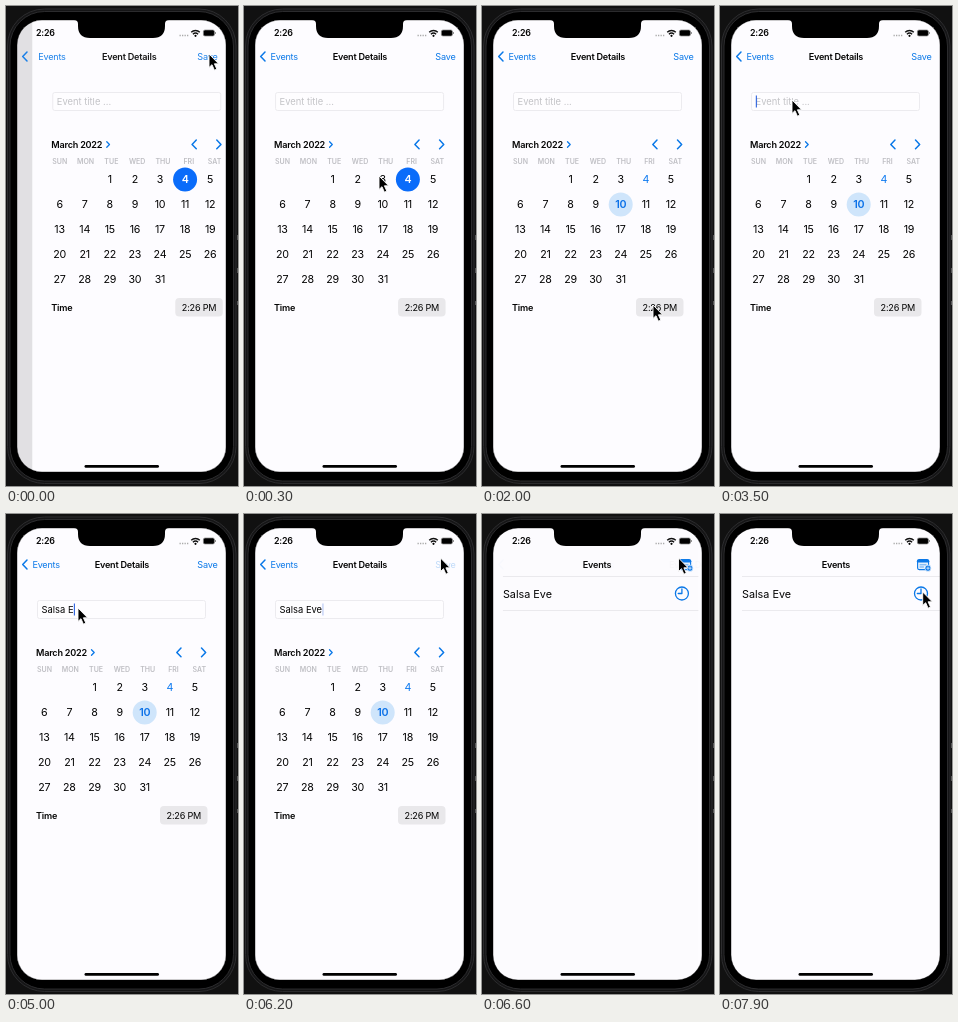
Recreate the animation shown at these times as an HTML page. Size 232 by 480 pixels, loop 8000 ms.

```html
<!DOCTYPE html>
<html lang="en">
<head>
<meta charset="utf-8">
<title>Event form</title>
<style>
  html, body { margin: 0; width: 100%; height: 100%; overflow: hidden; background: #111; }
  svg { display: block; }
  text { font: 9.1px Inter, sans-serif; letter-spacing: -.024em; fill: #050505; white-space: pre; }
  .bold { font-weight: 600; }
  .mid { text-anchor: middle; }
  .blue { fill: #0a78e8; }
  .field { font-size: 9.4px; letter-spacing: 0; }
  .day { font-size: 10.7px; }
  .week { font-size: 7px; font-weight: 600; letter-spacing: 0; fill: #bfbfc4; }
  .stroke { fill: none; stroke: #0a78e8; stroke-width: 1.5; stroke-linecap: round; stroke-linejoin: round; }
  .page { fill: #fdfcff; }
</style>
</head>
<body>
<svg width="232" height="480" viewBox="0 0 232 480">
  <clipPath id="screen"><rect x="11" y="14" width="209" height="452" rx="25"/></clipPath>
  <rect width="232" height="480" fill="#111"/>
  <path d="M231.5 229v70" stroke="#555" stroke-dasharray="5 28"/>
  <rect x="1.5" y="3" width="228.5" height="474.5" rx="37" fill="#151516" stroke="#2c2c2e"/>
  <rect x="4" y="5.5" width="223.5" height="469.5" rx="34.5" stroke="#343436" stroke-width=".8"/>

  <g clip-path="url(#screen)">
    <g id="list">
      <rect class="page" x="11" y="14" width="272" height="452"/>
      <g id="row">
        <path d="M22 62.5H220M22 96.5H220" stroke="#ebeaee"/>
        <text x="22" y="83.8" style="font-size:10.8px;letter-spacing:0">Salsa Eve</text>
        <g class="stroke" style="stroke-width:1.3">
          <circle cx="201" cy="79.5" r="6.5"/>
          <path d="M201 75V79.5H197.3"/>
        </g>
      </g>
    </g>
    <rect id="dim" x="11" y="14" width="209" height="452"/>

    <g id="form">
      <rect class="page" x="11" y="14" width="209" height="452"/>
      <rect x="31.5" y="86.5" width="168" height="18" rx="2" fill="#fefdff" stroke="#ecebef"/>
      <text id="title" class="field" x="35.5" y="99.2"></text>
      <rect id="caret" y="89.5" width="1.1" height="12" fill="#2c62e0"/>
      <text class="bold" x="30" y="141.6">March 2022</text>
      <path class="stroke" d="M85.5 135.8l2.7 2.7-2.7 2.7" style="stroke-width:1.3"/>
      <path class="stroke" d="M175 134l-4.2 4.4 4.2 4.4M195.5 134l4.2 4.4-4.2 4.4"/>
      <circle id="mark" r="12"/>
      <g id="days"></g>
      <text class="bold" x="30" y="304.6">Time</text>
      <rect x="154" y="292" width="47.5" height="18.5" rx="4" fill="#e9e8eb"/>
      <text x="160.6" y="304.6">2:26 PM</text>
    </g>

    <g id="formNav">
      <path class="stroke" d="M21 46l-4.3 4.5 4.3 4.5"/>
      <text id="back" class="blue" x="26.4" y="53.7">Events</text>
      <text id="formTitle" class="bold mid" x="115.9" y="53.7">Event Details</text>
      <text id="save" class="blue" x="191.3" y="53.7">Save</text>
    </g>
    <g id="listNav">
      <text id="listTitle" class="bold mid" x="115.9" y="53.7">Events</text>
      <g class="stroke" style="stroke-width:1.1">
        <rect x="197.6" y="45.6" width="11" height="10" rx="1.6" fill="#e4f0fc"/>
        <path d="M198.3 47.2h9.6" stroke-width="2.8"/>
        <path d="M200 50.8h6M200 53h3.5" stroke-width=".6"/>
        <circle cx="208" cy="54.2" r="3.1" fill="#0a78e8" stroke="#fdfcff" stroke-width=".7"/>
        <path d="M206.7 54.2h2.6M208 52.9v2.6" stroke="#fff" stroke-width=".7"/>
      </g>
    </g>

    <text class="bold" x="30" y="30.2" style="font-size:8.9px">2:26</text>
    <path d="M173.5 29.5h9" stroke="#aaa" stroke-width="1.3" stroke-dasharray="1.3 1.2"/>
    <path d="M185.2 26.3a6.2 6.2 0 0 1 8.6 0M186.9 28.2a3.8 3.8 0 0 1 5.2 0" fill="none" stroke="#111" stroke-width="1.4"/>
    <circle cx="189.5" cy="29.8" r="1.1"/>
    <rect x="197.4" y="24" width="11" height="6" rx="1.6" stroke="#888" stroke-width=".7"/>
    <path d="M209.4 26v2" stroke="#888"/>
    <path d="M68 14q4 0 4 4v2q0 12 12 12h63q12 0 12-12v-2q0-4 4-4z"/>
    <rect x="78.5" y="459" width="74.5" height="2.8" rx="1.4"/>
  </g>
  <rect x="11" y="14" width="209" height="452" rx="25" fill="none" stroke="#000" stroke-opacity=".4"/>

  <path id="cursor" d="M0 0V13.4L3 10.7 5.4 16.2 7.8 15.1 5.4 9.8H9.6Z" stroke="#fff" stroke-width=".9" stroke-linejoin="round"/>
</svg>
<script>
const LOOP = 8000, WIDTH = 209, NAME = 'Salsa Eve';
const $ = id => document.getElementById(id);
const dayX = n => 38.3 + 25.1 * ((n + 1) % 7);
const dayY = n => 173.5 + 25 * Math.floor((n + 1) / 7);

// time, x, y of the pointer
const path = [
  [0, 203, 48], [300, 135, 170], [500, 137, 197], [1100, 137, 197], [1700, 171, 299],
  [2100, 171, 299], [2700, 72, 94], [5500, 72, 94], [5900, 196.5, 44],
  [6700, 196.5, 44], [7300, 202.7, 78], [LOOP, 202.7, 78]
];

function addText(parent, className, x, y, content) {
  const el = document.createElementNS('http://www.w3.org/2000/svg', 'text');
  el.setAttribute('class', className + ' mid');
  el.setAttribute('x', x);
  el.setAttribute('y', y);
  el.textContent = content;
  return parent.appendChild(el);
}

['SUN', 'MON', 'TUE', 'WED', 'THU', 'FRI', 'SAT'].forEach((name, i) =>
  addText($('days'), 'week', 38.5 + 25.8 * i, 158.3, name));
const days = Array.from({ length: 31 }, (_, i) =>
  addText($('days'), 'day', dayX(i + 1), dayY(i + 1) + 3.9, i + 1));

function styleDay(n, fill, weight) {
  days[n - 1].style.fill = fill;
  days[n - 1].style.fontWeight = weight;
}

const move = (id, x, y = 0) => $(id).setAttribute('transform', `translate(${x} ${y})`);
const fade = (id, opacity) => $(id).setAttribute('opacity', opacity);

// Critically damped spring: distance left after t ms
const spring = t => t < 0 ? 1 : (1 + t / 50) * Math.exp(-t / 50);

function pointer(t) {
  const i = path.findIndex(key => key[0] > t);
  const [t0, x0, y0] = path[i - 1], [t1, x1, y1] = path[i];
  const u = (t - t0) / (t1 - t0), e = u * u * (3 - 2 * u);
  return [x0 + (x1 - x0) * e, y0 + (y1 - y0) * e];
}

function drawField(t) {
  const count = Math.max(0, Math.min(NAME.length, Math.floor((t - 3600) / 190)));
  const title = $('title');
  title.textContent = count ? NAME.slice(0, count) : 'Event title ...';
  title.style.fill = count ? '#050505' : '#c3c3c7';
  $('caret').setAttribute('x', 35.8 + (count ? title.getComputedTextLength() : 0));
  const typing = count > 0 && count < NAME.length;
  fade('caret', t < 3000 ? 0 : typing ? 1 : .5 + .5 * Math.cos((t - 3500) * Math.PI / 500));
}

function drawCalendar(t) {
  const picked = t >= 700, day = picked ? 10 : 4;
  const mark = $('mark');
  mark.setAttribute('cx', dayX(day));
  mark.setAttribute('cy', dayY(day));
  mark.setAttribute('fill', picked ? '#cfe5fb' : '#0a6cfa');
  styleDay(4, picked ? '#0a78f0' : '#fff', picked ? 400 : 600);
  styleDay(10, picked ? '#0a70e8' : '#050505', picked ? 600 : 400);
}

function draw(t) {
  // p is 0 on the form and 1 on the list
  const p = t < 3000 ? spring(t + 214) : 1 - spring(t - 6300);
  move('form', WIDTH * p);
  move('list', -.3 * WIDTH * (1 - p));
  fade('row', t < 6000 ? 0 : 1); // the list is empty until the event is saved
  fade('dim', .12 * (1 - p));
  move('formTitle', 100 * p);
  move('back', 80 * p);
  move('listTitle', -50 * (1 - p));
  fade('formNav', 1 - p);
  fade('listNav', Math.max(0, (p - .2) / .8));
  fade('save', t >= 6100 ? .25 : 1);
  drawCalendar(t);
  drawField(t);
  move('cursor', ...pointer(t));
}

function tick() {
  draw(Math.floor(performance.now() % LOOP / 100) * 100);
  requestAnimationFrame(tick);
}
tick();
</script>
</body>
</html>
```
